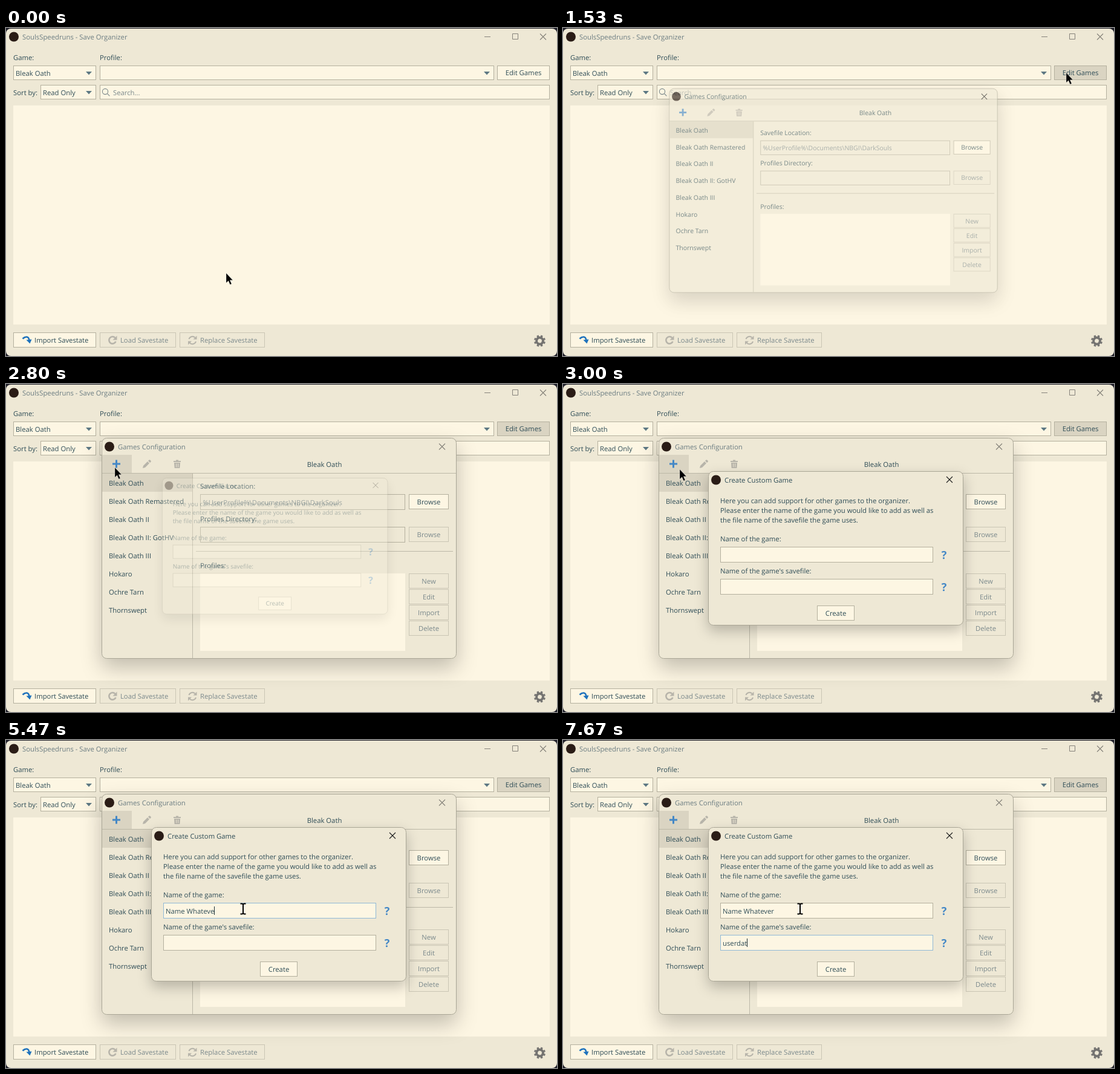
Animation, 911 px wide and 542 px high, one loop 8 s. Source, as an HTML page:

```html
<!DOCTYPE html>
<html lang="en">
<head>
<meta charset="utf-8">
<title>Save Organizer</title>
<style>
html, body { margin: 0; width: 100%; height: 100%; overflow: hidden; background: #20202a; }
svg { display: block; width: 911px; height: 542px; }
text {
  font: 11.3px "Open Sans", "Noto Sans", sans-serif;
  fill: #2f4d57; white-space: pre; text-rendering: geometricPrecision;
}
text.dim { fill: #7b898c; }
text.help { font-size: 18px; font-weight: 700; fill: #4488c6; }
.active { --title: #2f4d57; --chrome: #1c1c1c; }
.inactive { --title: #6c7d82; --chrome: #85827a; }
.title { fill: var(--title); }
.chrome { stroke: var(--chrome); fill: none; }
#games { filter: drop-shadow(0 15px 17px rgba(0, 0, 0, .23)); }
#create { filter: drop-shadow(0 9px 11px rgba(0, 0, 0, .23)); }
</style>
</head>
<body>
<svg id="stage" viewBox="0 0 911 542"></svg>
<script>
const LOOP = 8000;
const BG = '#eee8d5', CREAM = '#fdf6e3', PRESSED = '#dad4c2', HOVER = '#f3ecd7';
const LINE = '#b4b09e', SOFT = '#cac5b4', GREY = '#b7b4aa', FOCUS = '#90b9d6';

// Markup helpers; boxes take left, top, right, bottom.
const rect = (x, y, r, b, fill, extra = '') =>
  `<rect x="${x}" y="${y}" width="${r - x}" height="${b - y}" fill="${fill}" ${extra}/>`;
const box = (x, y, r, b, fill = CREAM, line = LINE, extra = '') =>
  rect(x + .5, y + .5, r - .5, b - .5, fill, `stroke="${line}" ${extra}`);
const label = (x, y, s, extra = '') => `<text x="${x}" y="${y}" ${extra}>${s}</text>`;
const mid = (x, y, s, cls = '') => label(x, y, s, `text-anchor="middle" class="${cls}"`);
const path = (d, extra) => `<path d="${d}" ${extra}/>`;
const stroke = (color, width) => `fill="none" stroke="${color}" stroke-width="${width}"`;

const button = (x, y, r, b, s, on = true, id = '') =>
  box(x, y, r, b, on ? CREAM : BG, on ? LINE : SOFT, id && `id="${id}"`) +
  mid((x + r) / 2, (y + b) / 2 + 4.3, s, on ? '' : 'dim');
const combo = (x, y, r, b, s = '') =>
  box(x, y, r, b) + label(x + 4, y + 17, s) +
  path(`M${r - 17} ${y + 10}h10l-5 5.5z`, 'fill="#5d7883"');
const cross = (x, y) => path(`M${x} ${y}l10 10m0 -10l-10 10`, 'class="chrome" stroke-width="1.1"');
const badge = (x, y) => `<circle cx="${x}" cy="${y}" r="8" fill="#2a1c16"/>`;
const caption = (x, y, s) => label(x, y, s, 'class="title"');
const frame = (x, y, r, b) => box(x, y, r, b, BG, '#aaa696', 'rx="8"');

const gear = (x, y) =>
  `<g transform="translate(${x} ${y}) rotate(11.25)">` +
  `<circle r="5.4" ${stroke('#747371', 4)}/>` +
  `<circle r="8" ${stroke('#747371', 3.2)} pathLength="16" stroke-dasharray="1 1"/></g>`;

function mainWindow() {
  return `<g id="main">` +
    rect(0, 1, 911, 542, BG, 'rx="8"') +
    badge(13, 14.5) + caption(27, 19, 'SoulsSpeedruns - Save Organizer') +
    path('M791 14.5h10M837.5 9.5h9v9h-9z', 'class="chrome"') + cross(883, 9.5) +
    label(12, 53, 'Game:') + label(155, 53, 'Profile:') +
    combo(12, 62, 149, 86, 'Bleak Oath') + combo(155, 62, 807, 86) +
    button(812, 62, 899, 86, 'Edit Games', true, 'edit') +
    label(12, 111, 'Sort by:') + combo(57, 94, 149, 118, 'Read Only') +
    box(155, 94, 899, 118) +
    `<circle cx="164" cy="105" r="4.6" ${stroke('#7b898c', 1.1)}/>` +
    path('M167.4 108.4l4 4', stroke('#7b898c', 1.2)) +
    label(177, 111, 'Search...', 'class="dim"') +
    rect(12, 128, 899, 490, CREAM) +
    box(12, 503, 149, 528) + label(47, 520, 'Import Savestate') +
    path('M27.5 513.5Q31 510 34.500 510.500Q38 511 38.500 517', stroke('#1f72bd', 2.6)) +
    path('M33.500 515.500L42.500 514.500L39.500 521.500z', 'fill="#1f72bd"') +
    box(155, 503, 281, 528, BG, SOFT) + label(189, 520, 'Load Savestate', 'class="dim"') +
    path('M180.500 512A5.800 5.800 0 1 0 181.500 518', stroke(GREY, 2.6)) +
    path('M183.500 508.500v7h-7z', `fill="${GREY}"`) +
    box(287, 503, 428, 528, BG, SOFT) + label(321, 520, 'Replace Savestate', 'class="dim"') +
    path('M302.500 514A6 6 0 0 1 312.500 511.500M314 518A6 6 0 0 1 304 520.500', stroke(GREY, 2)) +
    path('M315.500 508.500v6h-6zM301 523.500v-6h6z', `fill="${GREY}"`) +
    gear(882.5, 517) + `</g>`;
}

function gamesDialog() {
  const games = ['Bleak Oath', 'Bleak Oath Remastered', 'Bleak Oath II', 'Bleak Oath II: GotHV',
    'Bleak Oath III', 'Hokaro', 'Ochre Tarn', 'Thornswept'];
  return `<g id="games">` + frame(158, 89, 745, 454) +
    badge(171, 103.5) + caption(185, 108, 'Games Configuration') + cross(716, 98.5) +
    rect(159, 117, 208, 147, BG, 'id="plus"') +
    path('M176 132h13M182.500 125.500v13', stroke('#4488c6', 3)) +
    path('M226 139l1-4 7-7 3 3-7 7zM235 127l1.500-1.500q1 -.7 2 .3l1 1q.8 1 0 2l-1.500 1.300z', `fill="${GREY}"`) +
    path('M277 127h4v-1.500h4v1.500h4v2h-12zM278 130h10l-.7 9h-8.600z', `fill="${GREY}"`) +
    path('M281.500 131.500v6M284.500 131.500v6', stroke(BG, 1)) +
    mid(526.5, 137, 'Bleak Oath') +
    rect(159, 148, 308, 178, PRESSED) +
    path('M159 147.500h585M308.500 148v305', stroke('#bcb8a7', 1)) +
    path('M314 276.500h425', stroke('#bcb8a7', 1)) +
    games.map((s, i) => label(170, 168 + 30 * i, s)).join('') +
    label(321, 173, 'Savefile Location:') + box(321, 182, 660, 208, BG) +
    label(325.5, 200, '%UserProfile%\\Documents\\NBGI\\DarkSouls', 'class="dim"') +
    button(666, 182, 732, 207, 'Browse') +
    label(321, 227, 'Profiles Directory:') + box(321, 236, 660, 262, BG) +
    button(666, 236, 732, 261, 'Browse', false) +
    label(321, 304, 'Profiles:') + rect(321, 313, 660, 441, CREAM) +
    ['New', 'Edit', 'Import', 'Delete'].map((s, i) =>
      button(666, 313 + 26 * i, 732, 338 + 26 * i, s, false)).join('') + `</g>`;
}

function createDialog() {
  const field = (n, y) => box(260, y, 612, y + 26, CREAM, LINE, `id="field${n}"`) +
    `<text id="typed${n}" x="264" y="${y + 18}"></text>` +
    rect(264, y + 6, 265, y + 20, '#1d2d33', `id="caret${n}"`) +
    mid(630, y + 20, '?', 'help');
  return `<g id="create" class="active">` + frame(240, 144, 662, 399) +
    badge(253, 158.5) + caption(267, 163, 'Create Custom Game') + cross(634, 153) +
    label(260, 197, 'Here you can add support for other games to the organizer.') +
    label(260, 213, 'Please enter the name of the game you would like to add as well as') +
    label(260, 229, 'the file name of the savefile the game uses.') +
    label(260, 260, 'Name of the game:') + field(1, 269) +
    label(260, 313, "Name of the game's savefile:") + field(2, 322) +
    button(420, 366, 482, 391, 'Create') + `</g>`;
}

const pointers =
  path('M0 0V16.200L3.700 12.800L6.400 19L9 18L6.300 11.800H11z',
    'id="arrow" fill="#000" stroke="#fff" stroke-opacity=".55" stroke-width=".6"') +
  path('M-4.500 -8.500H-1.500L0 -7.500L1.500 -8.500H4.500M0 -8V8M-4.500 8.500H-1.500L0 7.500L1.500 8.500H4.500',
    `id="beam" ${stroke('#000', 2)}`);

const stage = document.getElementById('stage');
stage.innerHTML = mainWindow() + gamesDialog() + createDialog() + pointers;
const el = {};
stage.querySelectorAll('[id]').forEach(n => el[n.id] = n);

// Keyframes: time, then values.
const POINTER = [
  [330, 364, 405], [470, 384, 390], [600, 455, 328], [730, 578, 226], [870, 712, 135],
  [1000, 800, 86], [1130, 833, 74], [1530, 833, 74], [1600, 802, 81], [1730, 590, 128],
  [1870, 320, 157], [1930, 244, 151], [2070, 196, 142], [2270, 180, 138], [2930, 180, 138],
  [3000, 193, 141], [3130, 248, 180], [3270, 325, 248], [3400, 361, 279], [3470, 361, 279],
  [3600, 392, 279]];
const OPEN_GAMES = [[1530, .923, .62], [1600, .975, .9], [1670, .995, 1], [1730, 1, 1]];
const OPEN_CREATE = [[2800, .885, .32], [2870, .96, .75], [2930, .99, .95], [3000, 1, 1]];
const KEYS1 = [4070, 4200, 4330, 4470, 4530, 4670, 4800, 4930, 5070, 5130, 5270, 5330, 5470];
const KEYS2 = [6670, 6730, 6930, 7070, 7270, 7400, 7530, 7670];

function at(keys, t) {
  if (t <= keys[0][0]) return keys[0].slice(1);
  const i = keys.findIndex(k => k[0] > t);
  if (i < 0) return keys[keys.length - 1].slice(1);
  const a = keys[i - 1], b = keys[i], p = (t - a[0]) / (b[0] - a[0]);
  return a.slice(1).map((v, j) => v + (b[j + 1] - v) * p);
}

const show = (node, on) => node.setAttribute('visibility', on ? 'visible' : 'hidden');
const between = (t, a, b) => t >= a && t < b;

function openDialog(node, keys, cx, cy, t) {
  const [scale, alpha] = at(keys, t);
  node.style.display = t < keys[0][0] ? 'none' : '';
  node.setAttribute('transform', `translate(${cx} ${cy}) scale(${scale}) translate(${-cx} ${-cy})`);
  node.setAttribute('opacity', alpha);
}

function type(n, text, keys, t, focused, caretOn) {
  const typed = el['typed' + n], caret = el['caret' + n];
  typed.textContent = text.slice(0, keys.filter(k => k <= t).length);
  const width = typed.textContent ? typed.getComputedTextLength() : 0;
  caret.setAttribute('x', 264 + Math.round(width));
  caret.style.display = caretOn ? '' : 'none';
  el['field' + n].setAttribute('stroke', focused ? FOCUS : LINE);
}

function draw(t) {
  el.main.setAttribute('class', between(t, 1200, 1530) ? 'active' : 'inactive');
  el.games.setAttribute('class', t < 2800 ? 'active' : 'inactive');
  el.edit.setAttribute('fill', t < 1070 ? CREAM : t < 1200 ? HOVER : PRESSED);
  el.plus.setAttribute('fill', t < 2130 ? BG : t < 2670 ? '#e3ddca' : PRESSED);
  openDialog(el.games, OPEN_GAMES, 392, 233, t);
  openDialog(el.create, OPEN_CREATE, 396, 240, t);

  type(1, 'Name Whatever', KEYS1, t, between(t, 3400, 6130),
    between(t, 3400, 3930) || between(t, 4070, 5930));
  type(2, 'userdata', KEYS2, t, t >= 6130, t >= 6130);

  const [x, y] = at(POINTER, t).map(Math.round);
  const overField = t > 3000 && x >= 260 && between(y, 269, 295);
  show(el.arrow, !overField);
  show(el.beam, overField);
  for (const p of [el.arrow, el.beam]) p.setAttribute('transform', `translate(${x} ${y})`);
}

function tick() {
  const t = performance.now() % LOOP;
  draw(Math.floor((t + 4) * .015) / .015);
  requestAnimationFrame(tick);
}
tick();
</script>
</body>
</html>
```
